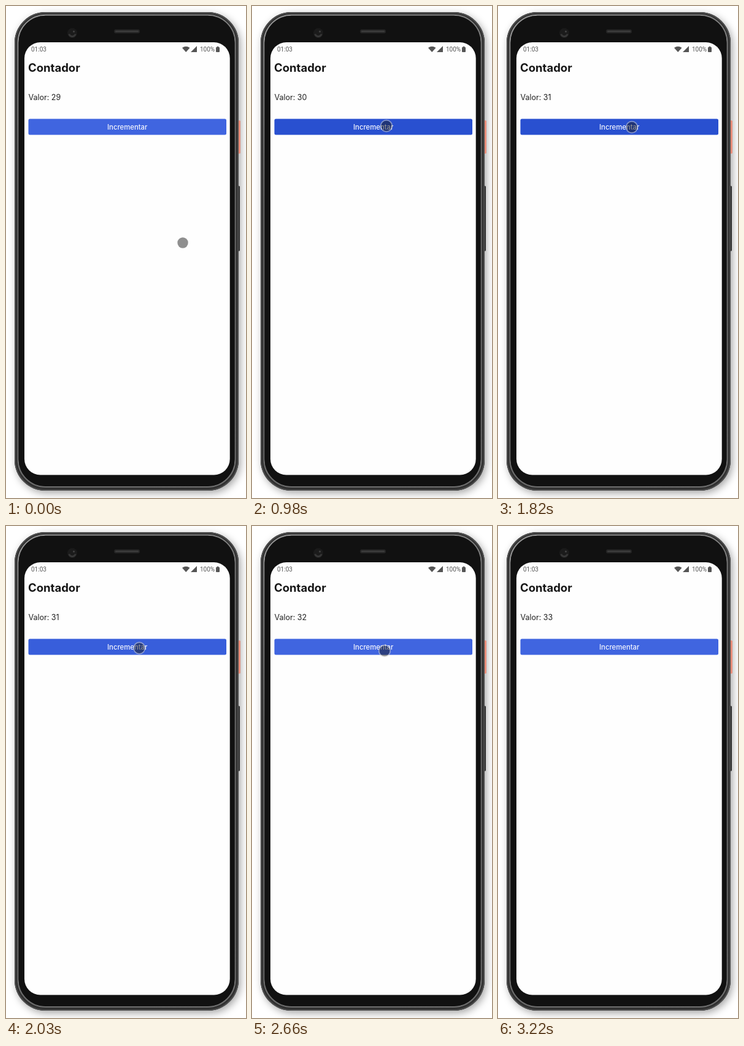
An HTML page with a canvas that plays this animation: 391x800 px, repeating every 3850 ms.

```html
<!DOCTYPE html>
<html lang="pt">
<head>
<meta charset="utf-8">
<title>Contador</title>
<style>
html, body { margin: 0; width: 100%; height: 100%; overflow: hidden; background: #fff; }
canvas { display: block; width: 391px; height: 800px; }
</style>
</head>
<body>
<canvas id="stage"></canvas>
<script>
const W = 391, H = 800, LOOP = 3850, STEP = 70;
const canvas = document.getElementById('stage');
const ctx = canvas.getContext('2d');
const dpr = window.devicePixelRatio || 1;
canvas.width = W * dpr;
canvas.height = H * dpr;

const LIGHT = [64, 101, 224], DARK = [41, 80, 208];
// press time, count time
const PRESSES = [[560, 980], [1400, 1750], [1960, 2240], [2660, 2870]];
const PATH = [
  [0, 288, 385], [490, 218, 190], [560, 219, 194], [980, 219, 195],
  [1190, 221, 197], [1470, 220, 197], [1820, 218, 197],
  [2310, 216, 201], [2660, 216, 203], [3220, 216, 203]
];

const clamp = v => Math.max(0, Math.min(1, v));
const ramp = (t, a, b) => clamp((t - a) / (b - a));
const ease = p => p * p * (3 - 2 * p);

function box(x, y, w, h, r, fill, g = ctx) {
  g.beginPath();
  g.roundRect(x, y, w, h, r);
  g.fillStyle = fill;
  g.fill();
}

function outline(x, y, w, h, r, color, width, g) {
  g.beginPath();
  g.roundRect(x, y, w, h, r);
  g.strokeStyle = color;
  g.lineWidth = width;
  g.stroke();
}

function disc(x, y, r, fill, g = ctx) {
  g.beginPath();
  g.arc(x, y, r, 0, Math.PI * 2);
  g.fillStyle = fill;
  g.fill();
}

function poly(points, fill, g) {
  g.beginPath();
  points.forEach(([x, y]) => g.lineTo(x, y));
  g.closePath();
  g.fillStyle = fill;
  g.fill();
}

function text(str, x, y, font, fill, align = 'left', g = ctx) {
  g.font = font;
  g.fillStyle = fill;
  g.textAlign = align;
  g.fillText(str, x, y);
}

function gradient(g, x0, y0, x1, y1, ...colors) {
  const fill = g.createLinearGradient(x0, y0, x1, y1);
  colors.forEach((c, i) => fill.addColorStop(i / (colors.length - 1), c));
  return fill;
}

function drawStatus(g) {
  const ink = '#555';
  text('01:03', 41, 74, '10px Roboto, sans-serif', ink, 'left', g);
  text('100%', 316, 74, '10px Roboto, sans-serif', ink, 'left', g);
  g.beginPath();
  g.moveTo(293.2, 75);
  g.lineTo(287, 68);
  g.quadraticCurveTo(293.2, 63.6, 299.5, 68);
  g.closePath();
  g.fillStyle = ink;
  g.fill();
  poly([[301, 75], [311, 75], [311, 65]], ink, g);
  box(342, 67, 6, 8, 1, ink, g);
  box(343.5, 65.8, 3, 2, 0, ink, g);
}

function drawBody(g) {
  g.save();
  g.shadowColor = 'rgba(0,0,0,.36)';
  g.shadowBlur = 13 * dpr;
  g.shadowOffsetX = 3 * dpr;
  g.shadowOffsetY = 4 * dpr;
  box(14, 10, 365, 778, 50, '#333', g);
  g.restore();

  // side keys
  box(374, 186, 7.8, 54, 1.5, gradient(g, 376, 0, 382, 0, '#c87060', '#f09580', '#e4826e'), g);
  box(374, 292.5, 7, 106, 1.5, gradient(g, 376, 0, 381, 0, '#111', '#444', '#222'), g);

  // metal rim, lit from the top left
  box(14, 10, 365, 778, 50, '#303030', g);
  outline(15, 11, 363, 776, 49, '#4c4c4c', 2, g);
  const shine = gradient(g, 14, 10, 379, 788, '#9a9a9a', '#6c6c6c', '#6c6c6c', '#707070');
  outline(19.5, 14.7, 354, 767.3, 45, shine, 2, g);
  box(20.5, 15.7, 352, 765.3, 44, '#111', g);
}

function drawLens(g) {
  disc(108, 44, 8, '#1b1b1b', g);
  g.beginPath();
  g.arc(108, 44, 5.5, 0.3, Math.PI - 0.3);
  g.strokeStyle = '#363636';
  g.lineWidth = 3;
  g.stroke();
  disc(110.5, 41.5, 1.5, '#444', g);
}

function drawPhone(g) {
  g.fillStyle = '#fff';
  g.fillRect(0, 0, W, H);
  drawBody(g);
  drawLens(g);
  box(176, 38, 42, 6.5, 3, '#252525', g);
  box(178, 40, 38, 2.5, 1.2, '#3c3c3c', g);
  box(30, 59, 334.7, 703.6, 26, '#fefefe', g);
  drawStatus(g);
  text('Contador', 36, 107, '700 18.5px Inter, sans-serif', '#161616', 'left', g);
}

const phone = document.createElement('canvas');
phone.width = canvas.width;
phone.height = canvas.height;
const phoneCtx = phone.getContext('2d');
phoneCtx.scale(dpr, dpr);
drawPhone(phoneCtx);
ctx.scale(dpr, dpr);

function pointer(t) {
  let i = 0;
  while (i < PATH.length - 2 && t >= PATH[i + 1][0]) i++;
  const [t0, x0, y0] = PATH[i], [t1, x1, y1] = PATH[i + 1];
  const p = ease(ramp(t, t0, t1));
  return [x0 + (x1 - x0) * p, y0 + (y1 - y0) * p];
}

function shade(t) {
  const p = Math.max(...PRESSES.map(([down, up]) =>
    ramp(t, down, down + 210) * (1 - ramp(t, up + 70, up + 210))));
  return `rgb(${LIGHT.map((c, i) => Math.round(c + (DARK[i] - c) * p))})`;
}

function drawPointer(t) {
  const [x, y] = pointer(t);
  ctx.globalAlpha = 1 - ramp(t, 3080, 3220);
  disc(x, y, 8.7, 'rgba(24,24,24,.48)');
  if (y < 220) {
    ctx.beginPath();
    ctx.arc(x, y, 9.3, 0, Math.PI * 2);
    ctx.strokeStyle = 'rgba(205,205,205,.55)';
    ctx.lineWidth = 1.8;
    ctx.stroke();
  }
  ctx.globalAlpha = 1;
}

function draw(now) {
  const t = Math.floor((now % LOOP) / STEP) * STEP;
  const count = 29 + PRESSES.filter(([, up]) => t >= up).length;
  ctx.drawImage(phone, 0, 0, W, H);
  text('Valor: ' + count, 36.5, 153, '400 12.5px Inter, sans-serif', '#222');
  box(36.5, 183.5, 322.5, 26, 2.5, shade(t));
  text('Incrementar', 197.7, 201, '500 11.3px Inter, sans-serif', '#f4f6ff', 'center');
  if (t < 3220) drawPointer(t);
}

const start = performance.now();
function tick() {
  draw(performance.now() - start);
  requestAnimationFrame(tick);
}
tick();
</script>
</body>
</html>
```
